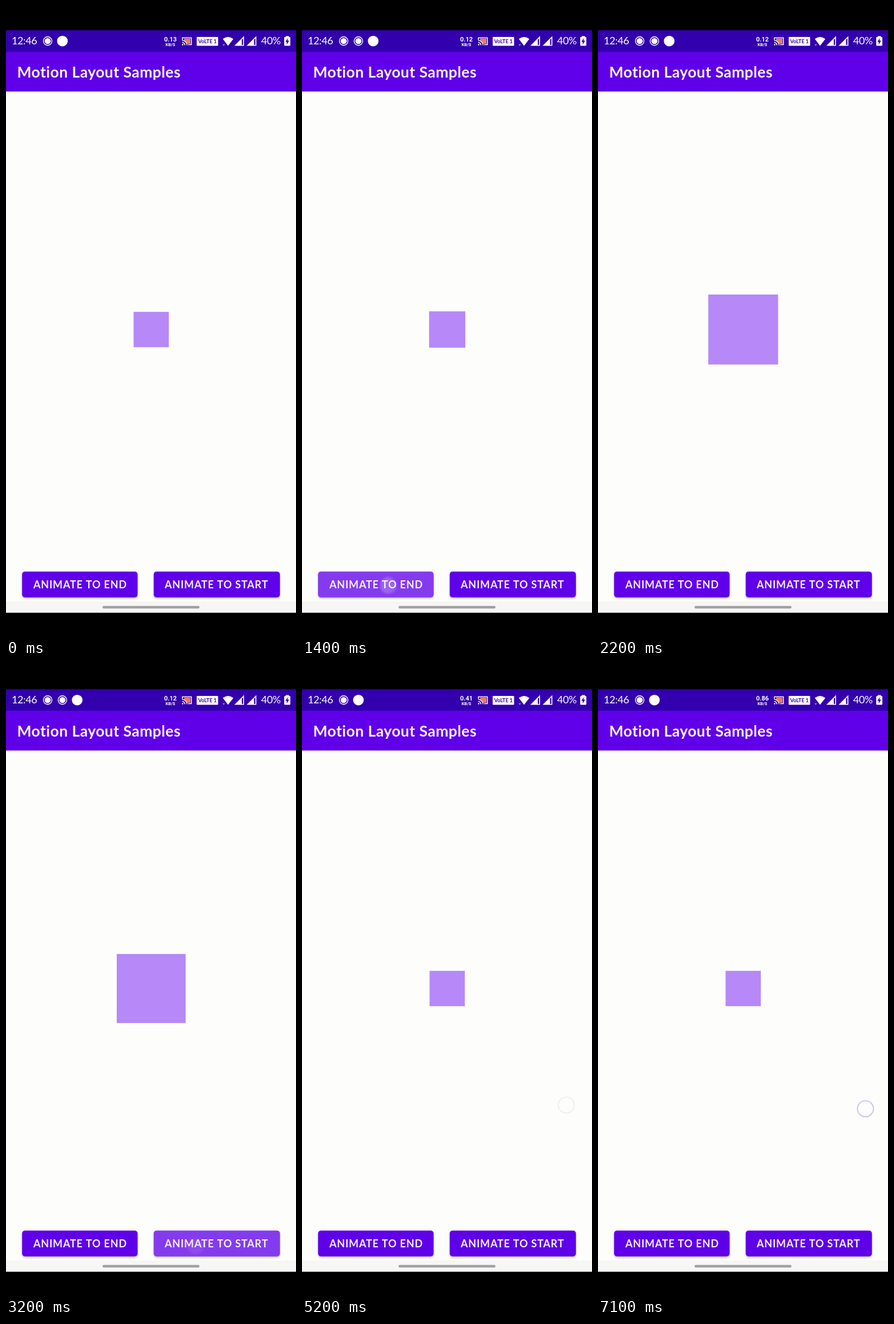
An HTML page with a canvas that plays this animation: 508 by 1102 pixels, repeating every 7200 ms.

```html
<!DOCTYPE html>
<html lang="en">
<head>
<meta charset="utf-8">
<title>Motion Layout Samples</title>
<style>
html, body { margin: 0; width: 100%; height: 100%; overflow: hidden; background: #000; }
canvas { display: block; width: 508px; height: 1102px; }
</style>
</head>
<body>
<canvas id="stage" width="508" height="1102"></canvas>
<script>
const ctx = document.getElementById('stage').getContext('2d');
const LOOP = 7200;
const PRIMARY = '#5f00e9', STATUS = '#3200ad', WHITE = '#fff', PAPER = '#fdfefc';
const GROW_AT = 1285, SHRINK_AT = 3060, MOVE_MS = 1110;
const BUTTON_Y = 987.7, BUTTON_H = 45;
const buttons = [
  { x: 28.2, w: 202.3, label: 'ANIMATE TO END', textX: 48 },
  { x: 258.8, w: 221, label: 'ANIMATE TO START', textX: 278 }
];
const touches = [
  { x: 151, y: 1012, down: 1180, up: 1360, button: 0 },
  { x: 332, y: 1015, down: 3000, up: 3060, button: 1 },
  { x: 463, y: 768.5, down: 4900, up: 5060 },
  { x: 468.5, y: 775, down: 7000, up: LOOP }
];

const clamp = v => Math.max(0, Math.min(1, v));

// Material standard curve: cubic-bezier(.4, 0, .2, 1)
function standardEase(x) {
  if (x <= 0 || x >= 1) return clamp(x);
  let lo = 0, hi = 1;
  for (let i = 0; i < 24; i++) {
    const s = (lo + hi) / 2, r = 1 - s;
    if (1.2 * r * r * s + 0.6 * r * s * s + s * s * s < x) lo = s; else hi = s;
  }
  return lo * lo * (3 - 2 * lo);
}

function rect(x, y, w, h, color) {
  ctx.fillStyle = color;
  ctx.fillRect(x, y, w, h);
}

function round(x, y, w, h, r, color) {
  ctx.fillStyle = color;
  ctx.beginPath();
  ctx.roundRect(x, y, w, h, r);
  ctx.fill();
}

function disc(x, y, r, color) {
  ctx.fillStyle = color;
  ctx.beginPath();
  ctx.arc(x, y, r, 0, Math.PI * 2);
  ctx.fill();
}

function ring(x, y, r, width, color) {
  ctx.strokeStyle = color;
  ctx.lineWidth = width;
  ctx.beginPath();
  ctx.arc(x, y, r, 0, Math.PI * 2);
  ctx.stroke();
}

function poly(points, color) {
  ctx.fillStyle = color;
  ctx.beginPath();
  points.forEach(([x, y]) => ctx.lineTo(x, y));
  ctx.closePath();
  ctx.fill();
}

function text(str, x, y, font, { color = WHITE, spacing = 0, align = 'left' } = {}) {
  ctx.font = font;
  ctx.letterSpacing = spacing + 'px';
  ctx.textAlign = align;
  ctx.fillStyle = color;
  ctx.fillText(str, x, y);
}

function recordIcon(x) {
  ring(x, 61.2, 7.5, 1.4, WHITE);
  disc(x, 61.2, 5.3, WHITE);
}

function castIcon() {
  ctx.strokeStyle = WHITE;
  ctx.lineWidth = 1.5;
  rect(312, 57, 11, 9, '#ee7d58');
  ctx.beginPath();
  ctx.moveTo(309, 59);
  ctx.lineTo(309, 55.5);
  ctx.lineTo(324.7, 55.5);
  ctx.lineTo(324.7, 67.5);
  ctx.lineTo(319, 67.5);
  ctx.stroke();
  ctx.fillStyle = STATUS;
  ctx.beginPath();
  ctx.moveTo(308, 69);
  ctx.arc(308, 69, 10, -Math.PI / 2, 0);
  ctx.fill();
  for (const r of [5, 8.6]) {
    ctx.beginPath();
    ctx.arc(308.5, 68.5, r, -Math.PI / 2, 0);
    ctx.stroke();
  }
  disc(309.5, 67.5, 1.3, WHITE);
}

function wifiIcon() {
  ctx.fillStyle = WHITE;
  ctx.beginPath();
  ctx.moveTo(389, 69.5);
  ctx.lineTo(379.8, 57.5);
  ctx.quadraticCurveTo(389, 50.5, 398.2, 57.5);
  ctx.closePath();
  ctx.fill();
  poly([[379.5, 67], [383.5, 67], [381.5, 69.5]], '#b9a8e4');
}

function signalIcon(x) {
  poly([[x, 69.5], [x + 17, 69.5], [x + 17, 52.5]], WHITE);
  poly([[x + 13, 68], [x + 15.3, 68], [x + 15.3, 56.5], [x + 13, 58.8]], STATUS);
}

function batteryIcon() {
  rect(490, 52.5, 5.5, 3, WHITE);
  round(487.3, 54, 10.8, 15.5, 1.5, WHITE);
  poly([[493.6, 56], [489.4, 62.8], [492, 62.8], [491.6, 67.5], [496, 60.6], [493.3, 60.6]], STATUS);
}

function statusBar(t) {
  rect(0, 42.3, 508, 37.7, STATUS);
  text('12:46', 10, 67, '18px Lato, sans-serif', { spacing: -0.4 });
  const extraIcon = t >= 600 && t < 4700;
  recordIcon(73);
  if (extraIcon) recordIcon(98.8);
  disc(extraIcon ? 124.7 : 98.8, 61.2, 9.3, WHITE);

  const speed = t < 700 ? '0.13' : t < 3700 ? '0.12' : t < 6700 ? '0.41' : '0.86';
  text(speed, 288, 62, 'bold 11px Roboto, sans-serif', { align: 'center' });
  text('KB/S', 288, 69.5, 'bold 7.5px Roboto, sans-serif', { align: 'center' });
  castIcon();
  round(334, 54, 37.5, 15.5, 1, WHITE);
  text('VoLTE 1', 352.8, 65.3, 'bold 8.9px Lato, sans-serif', { color: STATUS, align: 'center' });
  wifiIcon();
  signalIcon(400);
  signalIcon(421.5);
  text('40%', 447, 67, '18px Lato, sans-serif', { spacing: -0.4 });
  batteryIcon();
}

function ripple(touch, t) {
  const age = t - touch.down;
  const release = Math.max(touch.up, touch.down + 225);
  const fade = 1 - clamp((t - release) / 300);
  if (age < 0 || fade <= 0) return;
  const b = buttons[touch.button];
  ctx.save();
  ctx.beginPath();
  ctx.roundRect(b.x, BUTTON_Y, b.w, BUTTON_H, 5);
  ctx.clip();
  disc(touch.x, touch.y, 10 + 160 * clamp(age / 200), `rgba(255,255,255,${0.23 * fade})`);
  ctx.restore();
}

function drawButton(b, index, t) {
  ctx.save();
  ctx.shadowColor = 'rgba(0,0,0,.3)';
  ctx.shadowBlur = 3.5;
  ctx.shadowOffsetY = 1.7;
  round(b.x, BUTTON_Y, b.w, BUTTON_H, 5, PRIMARY);
  ctx.restore();
  touches.filter(p => p.button === index).forEach(p => ripple(p, t));
  text(b.label, b.textX, 1017, 'bold 18px Lato, sans-serif', { color: '#f8f3ff', spacing: 0.8 });
}

function drawTouch(p, t) {
  if (t < p.down) return;
  const alpha = 1 - clamp((t - p.up) / 200);
  if (alpha <= 0) return;
  ctx.save();
  ctx.globalAlpha = alpha;
  if (p.button === undefined) {
    ring(p.x, p.y, 14, 2.2, '#cfcde6');
  } else {
    const glow = ctx.createRadialGradient(p.x, p.y, 11, p.x, p.y, 17);
    glow.addColorStop(0, 'rgba(255,255,255,.26)');
    glow.addColorStop(0.35, 'rgba(255,255,255,.18)');
    glow.addColorStop(1, 'rgba(255,255,255,0)');
    disc(p.x, p.y, 17, glow);
  }
  ctx.restore();
}

function draw(t) {
  rect(0, 0, 508, 1102, '#000');
  rect(0, 43, 508, 1016.4, PAPER);
  const shade = ctx.createLinearGradient(0, 149, 0, 152);
  shade.addColorStop(0, 'rgba(0,0,0,.06)');
  shade.addColorStop(1, 'rgba(0,0,0,0)');
  rect(0, 149, 508, 3, shade);
  rect(0, 80, 508, 69.3, PRIMARY);
  text('Motion Layout Samples', 19.5, 124.5, 'bold 26.5px Lato, sans-serif', { color: '#faf6ff', spacing: 0.45 });
  statusBar(t);

  const grown = standardEase((t - GROW_AT) / MOVE_MS) - standardEase((t - SHRINK_AT) / MOVE_MS);
  const size = 61.7 * (1 + grown);
  rect(254.35 - size / 2, 565 - size / 2, size, size, '#b788f8');

  rect(0, 1040, 508, 19.4, '#f6f7f5');
  buttons.forEach((b, i) => drawButton(b, i, t));
  round(169, 1047.8, 170, 4.4, 2.2, '#a1a1a1');
  touches.forEach(p => drawTouch(p, t));
}

const start = performance.now();
function tick() {
  draw((performance.now() - start) % LOOP);
  requestAnimationFrame(tick);
}
tick();
</script>
</body>
</html>
```
